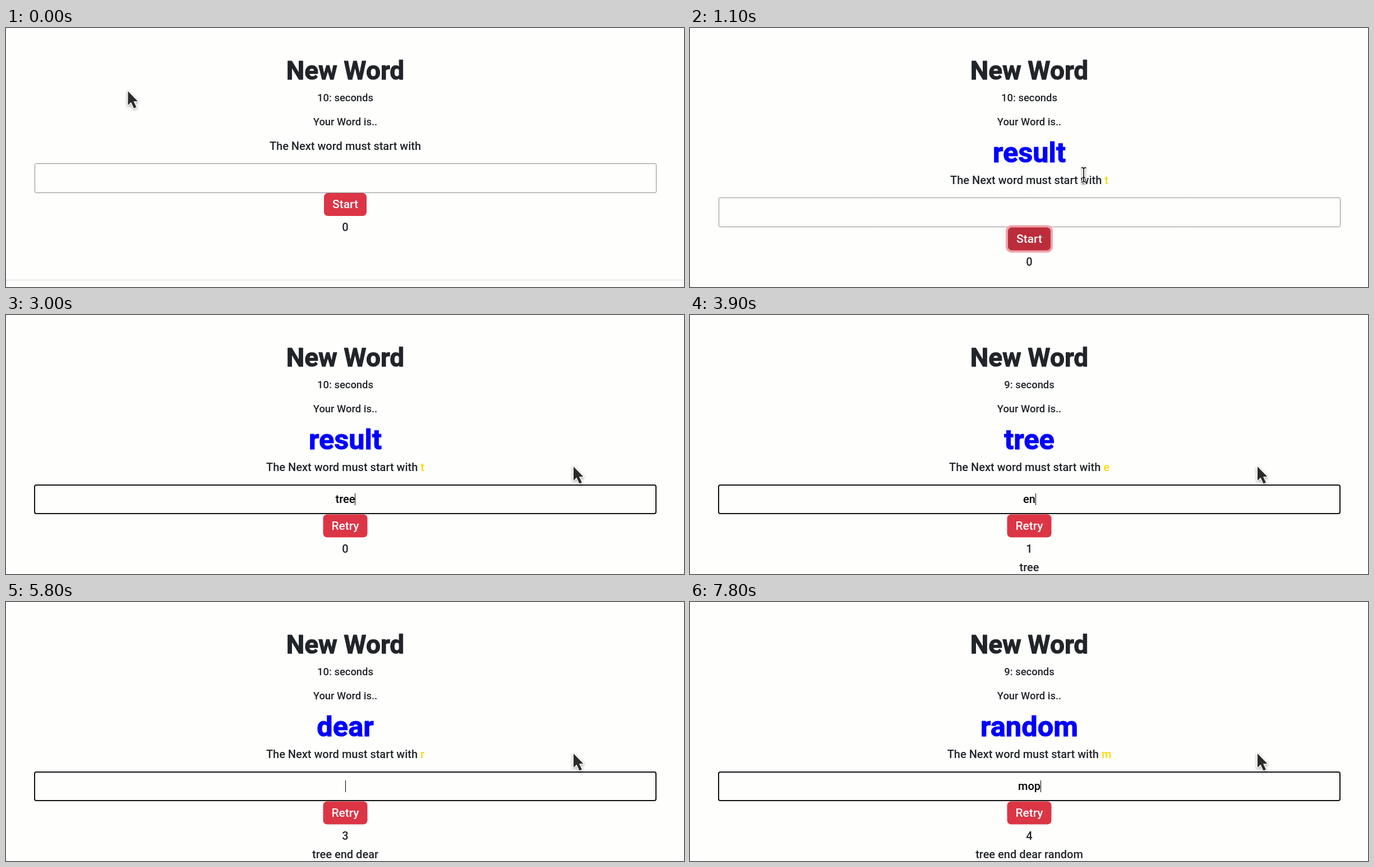
These frames come from a looping animation (1209 by 463 pixels, 8 s). An HTML page with a canvas:

```html
<!DOCTYPE html>
<html lang="en">
<head>
<meta charset="utf-8">
<title>New Word</title>
<style>
  html, body { margin: 0; width: 100%; height: 100%; overflow: hidden; background: #fefefd; }
  canvas { display: block; }
</style>
</head>
<body>
<canvas id="stage" width="1209" height="463"></canvas>
<script>
const ctx = document.getElementById('stage').getContext('2d');
const LOOP = 8000, STEP = 100, MID = 605;
const INK = '#212529', RED = '#dc3545', DARK_RED = '#bb2d3b', PAPER = '#fefefd';
const CLICK = 700, WORD_SHOWN = 900, HOVER_END = 1200, FOCUS = 1700;

// Each track lists [start time, value]; a value holds until the next entry.
const words = [[0, ''], [900, 'result'], [3300, 'tree'], [4500, 'end'], [5800, 'dear'], [7200, 'random']];
const seconds = [[0, 10], [3500, 9], [4500, 10], [5500, 9], [5800, 10], [6500, 9], [7200, 10], [7500, 9]];
const typed = [
  [0, ''], [2500, 't'], [2600, 'tr'], [2700, 'tre'], [3000, 'tree'],
  [3300, ''], [3700, 'e'], [3900, 'en'], [4100, 'end'],
  [4500, ''], [4800, 'd'], [5000, 'de'], [5200, 'dea'], [5300, 'dear'],
  [5800, ''], [6200, 'r'], [6300, 'ra'], [6400, 'ran'], [6600, 'rand'], [6700, 'rando'], [6800, 'random'],
  [7200, ''], [7500, 'm'], [7700, 'mo'], [7800, 'mop']
];
const caret = [
  [0, false], [FOCUS, true], [2200, false], [2500, true], [3500, false], [3700, true],
  [4700, false], [4800, true], [5900, false], [6200, true], [7300, false], [7500, true]
];
const pointer = [[0, 'arrow'], [600, 'hand'], [1000, 'beam'], [2100, 'arrow']];
const path = [
  [0, 217.5, 113], [200, 300, 160], [500, 560, 290], [700, 614, 326], [900, 614, 326],
  [1100, 702, 262.5], [1400, 800, 290], [1700, 890, 346], [1900, 904.5, 318.5], [2200, 1012, 271]
];

const indexAt = (track, t) => track.findLastIndex(entry => entry[0] <= t);
const valueAt = (track, t) => track[indexAt(track, t)][1];

function positionAt(t) {
  const i = indexAt(path, t);
  const [t0, x0, y0] = path[i];
  const [t1, x1, y1] = path[i + 1] || [LOOP, x0, y0];
  const k = (t - t0) / (t1 - t0);
  return [x0 + (x1 - x0) * k, y0 + (y1 - y0) * k];
}

function setFont(size, weight = 500) {
  ctx.font = `${weight} ${size}px Roboto, sans-serif`;
}

function text(str, y, size = 20, color = INK) {
  setFont(size);
  ctx.textAlign = 'center';
  ctx.fillStyle = color;
  ctx.fillText(str, MID, y);
}

// Large bold text with softened corners.
function title(str, y, size, color) {
  setFont(size, 700);
  ctx.textAlign = 'center';
  ctx.fillStyle = ctx.strokeStyle = color;
  ctx.lineJoin = 'round';
  ctx.lineWidth = 1;
  ctx.fillText(str, MID, y);
  ctx.strokeText(str, MID, y);
}

function roundRect(x, y, w, h, r) {
  ctx.beginPath();
  ctx.roundRect(x, y, w, h, r);
}

function hint(letter, y) {
  const label = 'The Next word must start with';
  if (!letter) return text(label, y);
  setFont(20);
  const lead = label + ' ';
  const leadWidth = ctx.measureText(lead).width;
  const left = MID - (leadWidth + ctx.measureText(letter).width) / 2;
  ctx.textAlign = 'left';
  ctx.fillStyle = INK;
  ctx.fillText(lead, left, y);
  ctx.fillStyle = '#ffd700';
  ctx.fillText(letter, left + leadWidth, y);
}

function input(t, y) {
  const focused = t >= FOCUS;
  ctx.strokeStyle = focused ? '#101010' : '#8c8c8c';
  ctx.lineWidth = focused ? 2 : 1;
  const inset = ctx.lineWidth / 2;
  const left = focused ? 50 : 51;
  roundRect(left + inset, y + inset, 1160 - left - 2 * inset, 53 - 2 * inset, focused ? 3 : 2);
  ctx.stroke();

  const value = valueAt(typed, t);
  text(value, y + 33, 20, '#000');
  if (valueAt(caret, t)) {
    const x = Math.round(MID + ctx.measureText(value).width / 2);
    ctx.fillRect(x, y + 16, 1, 21);
  }
}

function button(t, y) {
  const label = t < 2500 ? 'Start' : 'Retry';
  const width = t < 2500 ? 76 : 79;
  const x = MID - width / 2;
  if (t >= CLICK && t < FOCUS) {
    ctx.fillStyle = '#f0a3aa';
    roundRect(x - 4, y - 4, width + 8, 49, 10);
    ctx.fill();
  }
  ctx.fillStyle = t >= 600 && t < HOVER_END ? DARK_RED : RED;
  roundRect(x, y, width, 41, 7);
  ctx.fill();
  text(label, y + 27, 21, '#fff');
}

function polygon(points) {
  points.forEach(([x, y], i) => i ? ctx.lineTo(x, y) : ctx.moveTo(x, y));
  ctx.closePath();
}

function outlined(fill) {
  ctx.lineWidth = 3;
  ctx.strokeStyle = '#fff';
  ctx.stroke();
  ctx.shadowColor = 'transparent';
  ctx.fillStyle = fill;
  ctx.fill();
}

const drawPointer = {
  arrow() {
    polygon([[0, 0], [0, 25], [5.5, 19.5], [10.5, 30.5], [15, 28.5], [10, 18], [17.5, 18]]);
    outlined('#2b2b2b');
  },
  hand() {
    ctx.roundRect(-2, 0, 4.5, 18, 2);
    ctx.roundRect(2, 8, 4.5, 10, 2);
    ctx.roundRect(6, 9, 4.5, 10, 2);
    ctx.roundRect(10, 11, 4, 9, 2);
    ctx.roundRect(-3, 13, 17, 12, 4);
    polygon([[-2, 14], [-7, 12], [-3, 21]]);
    outlined('#2b2b2b');
  },
  beam() {
    for (const end of [-1, 1]) {
      ctx.moveTo(-4, end * 13);
      ctx.quadraticCurveTo(0, end * 13, 0, end * 10);
      ctx.quadraticCurveTo(0, end * 13, 4, end * 13);
    }
    ctx.moveTo(0, -11);
    ctx.lineTo(0, 11);
    ctx.moveTo(-2.5, 5);
    ctx.lineTo(2.5, 5);
    ctx.lineWidth = 5;
    ctx.strokeStyle = '#fff';
    ctx.stroke();
    ctx.shadowColor = 'transparent';
    ctx.lineWidth = 1.8;
    ctx.strokeStyle = '#222';
    ctx.stroke();
  }
};

function mouse(t) {
  ctx.save();
  ctx.translate(...positionAt(t));
  ctx.lineJoin = 'round';
  ctx.shadowColor = 'rgba(0, 0, 0, .4)';
  ctx.shadowBlur = 4;
  ctx.shadowOffsetY = 1.5;
  ctx.beginPath();
  drawPointer[valueAt(pointer, t)]();
  ctx.restore();
}

function render(t) {
  const word = valueAt(words, t);
  const shift = t >= WORD_SHOWN ? 61.5 : 0;
  const score = Math.max(0, indexAt(words, t) - 1);
  const found = words.slice(2, 2 + score).map(entry => entry[1]);

  ctx.fillStyle = PAPER;
  ctx.fillRect(0, 0, 1209, 463);
  title('New Word', 92, 46, INK);
  text(`${valueAt(seconds, t)}: seconds`, 130.5, 18.4);
  text('Your Word is..', 174, 18.4);
  title(word, 240, 50.5, '#0000fe');
  hint(word.slice(-1), 218 + Math.floor(shift));
  input(t, 242 + Math.floor(shift));
  button(t, 295 + shift);
  text(score, 363 + shift);
  text(found.join(' '), 458);
  if (!shift) {
    ctx.fillStyle = '#d9d9d9';
    ctx.fillRect(0, 450, 1209, 1);
  }
  mouse(t);
}

function frame() {
  const t = performance.now() % LOOP;
  render(Math.floor(t / STEP) * STEP);
  requestAnimationFrame(frame);
}
frame();
</script>
</body>
</html>
```
